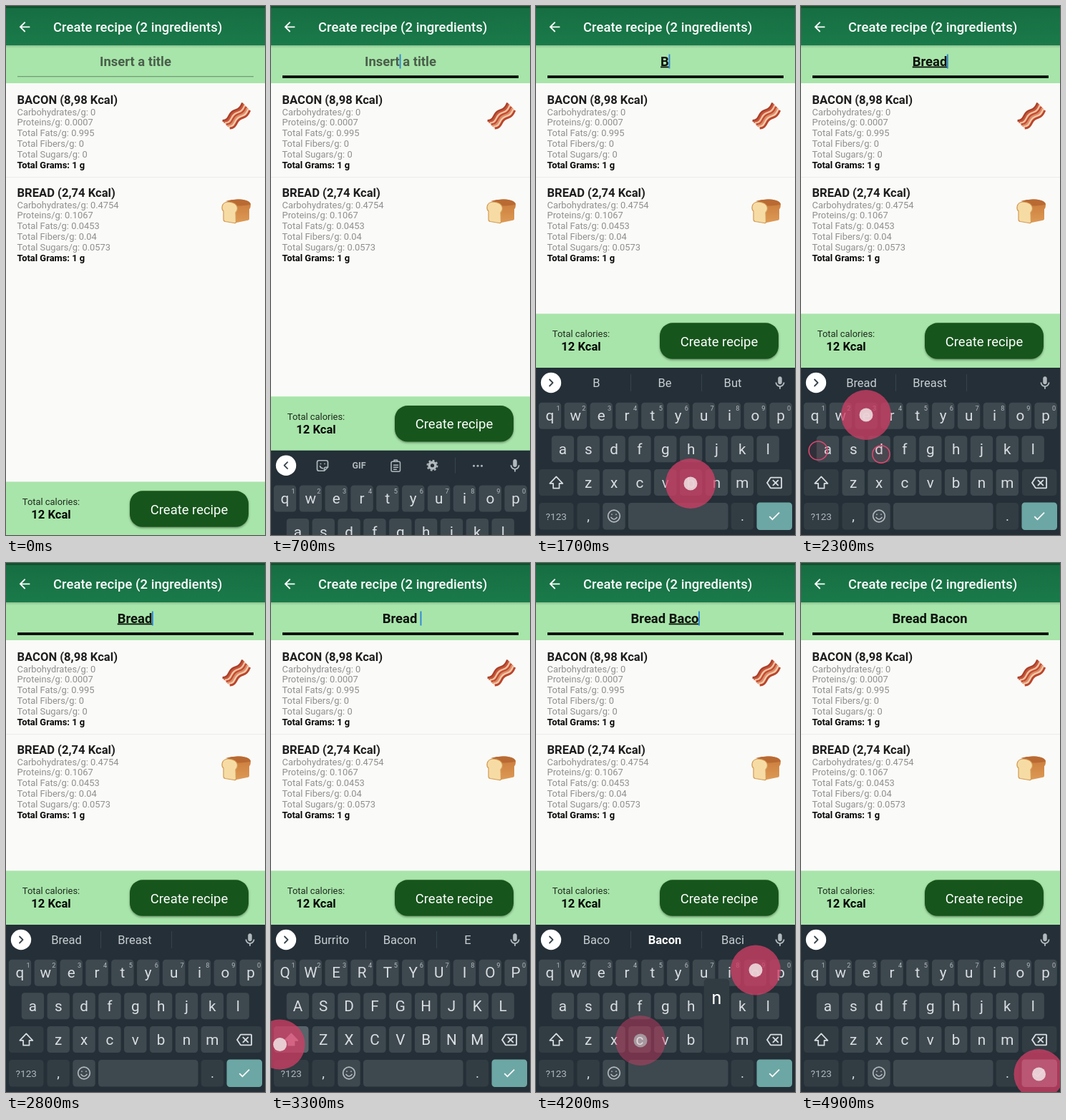
These frames come from a looping animation (362x740 px, 5000 ms). An HTML page:

```html
<!DOCTYPE html>
<html lang="en">
<head>
<meta charset="utf-8">
<title>Create recipe</title>
<style>
  html, body { margin: 0; width: 100%; height: 100%; overflow: hidden; background: #fafaf8; }
  svg { display: block; width: 362px; height: 740px; font-family: Roboto, sans-serif; }
  text { white-space: pre; }
</style>
</head>
<body>
<svg id="stage" viewBox="0 0 362 740">
  <defs>
    <linearGradient id="bar" x2="0" y2="1">
      <stop offset="0" stop-color="#166d41"/><stop offset="1" stop-color="#1a7a4a"/>
    </linearGradient>
    <linearGradient id="shade" x2="0" y2="1">
      <stop offset="0" stop-opacity=".16"/><stop offset="1" stop-opacity="0"/>
    </linearGradient>
    <linearGradient id="side" x2="0" y2="1">
      <stop offset="0" stop-color="#c9793a"/><stop offset="1" stop-color="#dd9a55"/>
    </linearGradient>
    <filter id="drop" x="-10%" y="-20%" width="120%" height="150%">
      <feDropShadow dx="0" dy="1.5" stdDeviation="1.4" flood-opacity=".4"/>
    </filter>
  </defs>
</svg>
<script>
const LOOP = 5000, SLIDE = 235;
const GREEN = '#a8e5aa', KEY = '#3e484f', FUNC = '#313c43', INK = '#d9dee1', DIM = '#b1b9bd';
const stage = document.getElementById('stage');

function el(tag, attrs, parent = stage) {
  const node = document.createElementNS('http://www.w3.org/2000/svg', tag);
  set(node, attrs);
  return parent.appendChild(node);
}
function set(node, attrs) {
  for (const k in attrs) node.setAttribute(k, attrs[k]);
}
function show(node, on) { node.setAttribute('visibility', on ? 'visible' : 'hidden'); }
function rect(x, y, width, height, fill, parent, rx = 0) {
  return el('rect', { x, y, width, height, fill, rx }, parent);
}
function text(str, x, y, size, fill, parent, attrs = {}) {
  const node = el('text', { x, y, 'font-size': size, fill, ...attrs }, parent);
  node.textContent = str;
  return node;
}
const MID = { 'text-anchor': 'middle' }, BOLD = { 'font-weight': 700 };
// Icons use a 24-unit box centred on x, y.
function icon(d, x, y, scale, fill, parent, attrs = {}) {
  const transform = `translate(${x - 12 * scale} ${y - 12 * scale}) scale(${scale})`;
  return el('path', { d, transform, fill, ...attrs }, parent);
}
function line(d, parent, stroke = DIM, width = 1.7) {
  return el('path', { d, fill: 'none', stroke, 'stroke-width': width, 'stroke-linecap': 'round', 'stroke-linejoin': 'round' }, parent);
}

// Header
rect(0, 55, 362, 53, GREEN);
rect(0, 0, 362, 55, 'url(#bar)');
rect(0, 0, 362, 3, '#10532f');
rect(0, 55, 362, 4, 'url(#shade)');
icon('M20 11H7.83l5.59-5.59L12 4l-8 8 8 8 1.41-1.41L7.83 13H20v-2z', 26, 29.3, 0.92, '#fff');
text('Create recipe (2 ingredients)', 66, 36, 18.44, '#fff', stage, { 'font-weight': 500, 'letter-spacing': 0.05 });

// Title field
const hint = text('Insert a title', 181, 83.5, 18.44, '#4a5f4b', stage, { ...MID, ...BOLD });
const title = text('', 180, 83.5, 18.44, '#0c120c', stage, { ...MID, ...BOLD });
const fixed = el('tspan', {}, title);
const composing = el('tspan', { 'text-decoration': 'underline' }, title);
const rule = rect(16, 98, 330, 1, '#66896a');
const caret = rect(180, 67.5, 1.9, 20, '#2f86d8');

// Ingredients
function ingredient(top, name, carbs, proteins, fats, fibers, sugars) {
  text(name, 15.5, top, 16.6, '#1e1e1e', stage, BOLD);
  [`Carbohydrates/g: ${carbs}`, `Proteins/g: ${proteins}`, `Total Fats/g: ${fats}`,
   `Total Fibers/g: ${fibers}`, `Total Sugars/g: ${sugars}`]
    .forEach((s, i) => text(s, 15.5, top + 15.7 + i * 14.75, 12.9, '#8f8f8f'));
  text('Total Grams: 1 g', 15.5, top + 89.5, 12.9, '#060606', stage, BOLD);
}
ingredient(137, 'BACON (8,98 Kcal)', 0, 0.0007, 0.995, 0, 0);
ingredient(267, 'BREAD (2,74 Kcal)', 0.4754, 0.1067, 0.0453, 0.04, 0.0573);
rect(0, 239, 362, 1, '#ececea');

['#a8402a', '#c9553a', '#f0c3a0', '#c44c31', '#dd8a67', '#f2cba9', '#bb452c'].forEach((c, i) =>
  el('path', {
    d: 'M0 0c6 0 8-4 10-8s5-6 9-7 7-5 9-10', fill: 'none', stroke: c, 'stroke-width': 2.9,
    transform: `translate(${302.6 + i * 1.7} ${160.5 + i * 1.75})`
  }));

el('path', { d: 'M309 273q8-3 18-2.5 15 1 15 8 0 4-2 6v13q0 2-3 2.500l-17 3.500V279z', fill: 'url(#side)' });
el('path', { d: 'M307 273q8-3 19-2.500 15 1 16 7-8 2-19 2-4-5-16-6.500z', fill: '#b96a33' });
el('path', { d: 'M304 287q-2.500-2-2-6 1-7 9-7 12 1 12.500 9 0 4-2.500 6l.5 13q0 2-3 1.500l-12-2q-2.500-.5-2.500-3z', fill: '#f6dca4', stroke: '#d39a55', 'stroke-width': 1.2 });

// Footer and keyboard slide together
const sheet = el('g', {});
rect(0, 430.5, 362, 76, GREEN, sheet);
text('Total calories:', 63, 463.3, 12.9, '#1f2a1f', sheet, MID);
text('12 Kcal', 63, 482, 16.6, '#060906', sheet, { ...MID, ...BOLD });
set(rect(173, 443.3, 166, 50.500, '#18541b', sheet, 18), { filter: 'url(#drop)' });
text('Create recipe', 256, 475.7, 18.44, '#fff', sheet, MID);

rect(0, 506, 362, 236, '#242f37', sheet);
el('circle', { cx: 21, cy: 527, r: 14.2, fill: '#fff' }, sheet);
const chevron = line('', sheet, '#37434a', 1.8);
icon('M12 14c1.66 0 3-1.34 3-3V5c0-1.66-1.34-3-3-3S9 3.34 9 5v6c0 1.66 1.34 3 3 3zm5-3c0 2.76-2.24 5-5 5s-5-2.24-5-5H5c0 3.53 2.61 6.43 6 6.92V21h2v-3.08c3.39-.49 6-3.39 6-6.92h-2z', 341, 527.5, 0.92, DIM, sheet);

const tools = el('g', {}, sheet);
line('M67 520h10q2.500 0 2.500 2.500v7l-5 5h-7.500q-2.500 0-2.500-2.500v-9.500q0-2.500 2.500-2.500zM79 529.500h-2.500q-2 0-2 2v2.500M68.500 528q1 3 4 3M69.500 524.500v.2M75 524.500v.2', tools);
text('GIF', 123, 531.7, 12.5, DIM, tools, { ...MID, ...BOLD });
line('M170 521.500h8.500q2 0 2 2v10q0 2-2 2h-8.500q-2 0-2-2v-10q0-2 2-2zM172 521v-1.500h4.500v1.500M171.500 526.500h6M171.500 529.500h6M171.500 532.500h4', tools, DIM, 1.5);
el('circle', { cx: 225.5, cy: 527, r: 4.4, fill: 'none', stroke: DIM, 'stroke-width': 3.6 }, tools);
el('circle', { cx: 225.5, cy: 527, r: 7, fill: 'none', stroke: DIM, 'stroke-width': 2, 'stroke-dasharray': 2.75 }, tools);
rect(257, 516, 1, 22, '#39454c', tools);
[283.5, 289, 294.5].forEach(cx => el('circle', { cx, cy: 527.5, r: 1.5, fill: DIM }, tools));

const words = el('g', {}, sheet);
[132, 231].forEach(x => rect(x, 515, 1, 24, '#37434a', words));
const slots = [84.500, 180, 275].map(x => text('', x, 533, 16.5, '#c8ced2', words, MID));

const PITCH = 35.85, keys = {};
function letterKey(ch, x, y, digit) {
  rect(x - 15.7, y - 18.500, 31.4, 37, KEY, sheet, 4.5);
  const label = text(ch, x, y + 7, 20.7, INK, sheet, MID);
  if (digit) text(digit, x + 11.5, y - 7.5, 9.2, DIM, sheet, MID);
  keys[ch] = { x, y, label };
}
[...'qwertyuiop'].forEach((c, i) => letterKey(c, 19.5 + i * PITCH, 573.3, (i + 1) % 10 + ''));
[...'asdfghjkl'].forEach((c, i) => letterKey(c, 37.4 + i * PITCH, 619.8));
[...'zxcvbnm'].forEach((c, i) => letterKey(c, 73.2 + i * PITCH, 666.5));

const shiftKey = rect(4, 648, 48.500, 37, FUNC, sheet, 4.5);
const arrow = icon('M12 2.500 2 13h5.300v7.500h9.400V13H22z', 28.3, 667, 0.9, 'none', sheet, { stroke: INK, 'stroke-width': 1.9, 'stroke-linejoin': 'round' });
rect(309, 648, 48.500, 37, FUNC, sheet, 4.5);
icon('M22 3H7c-.69 0-1.23.35-1.59.88L0 12l5.41 8.11c.36.53.9.89 1.59.89h15c1.1 0 2-.9 2-2V5c0-1.1-.9-2-2-2zm0 16H7.07L2.400 12l4.660-7H22v14zm-11.590-2L14 13.410 17.590 17 19 15.590 15.410 12 19 8.410 17.590 7 14 10.590 10.410 7 9 8.410 12.590 12 9 15.590z', 333, 667, 0.92, INK, sheet);
rect(4, 695, 48.500, 37.5, FUNC, sheet, 4.5);
text('?123', 28.3, 718.7, 13.6, DIM, sheet, MID);
rect(57.5, 695, 31.4, 37.5, FUNC, sheet, 4.5);
text(',', 73.2, 720, 19, INK, sheet, MID);
rect(93.3, 695, 31.4, 37.5, KEY, sheet, 4.5);
el('circle', { cx: 109, cy: 713.5, r: 8.3, fill: 'none', stroke: DIM, 'stroke-width': 1.7 }, sheet);
line('M105 715.500q4 5 8 0M106 711v.3M112 711v.3', sheet);
rect(129, 695, 139.500, 37.5, KEY, sheet, 4.5);
rect(272.7, 695, 31.4, 37.5, FUNC, sheet, 4.5);
text('.', 288.4, 720, 19, INK, sheet, MID);
rect(308.5, 694.5, 49.500, 38.5, '#6ca7a5', sheet, 4.5);
icon('M9 16.170 4.830 12l-1.420 1.410L9 19 21 7l-1.410-1.410z', 333, 713.5, 0.85, '#fff', sheet);

const popup = el('g', {}, sheet);
rect(-17.8, -85, 35.6, 104, '#303b42', popup, 5);
const popLabel = text('', 0, -50, 25, '#fff', popup, MID);

// Touches: press time, x, y, key
const RELEASE = 110;
const taps = [
  [150, 182, 79, 'field'],
  [945, 30, 670, 'shift'], [1400, 216, 668, 'b'], [1740, 126, 574, 'r'],
  [2020, 91, 572, 'e'], [2095, 24, 622, 'a'], [2170, 112, 627, 'd'], [2700, 200, 714, ' '],
  [3015, 12.5, 673.5, 'shift'], [3400, 216, 669, 'b'], [3620, 30, 622, 'a'],
  [3770, 146, 668, 'c'], [3910, 307, 569.5, 'o'], [4150, 252, 668, 'n'],
  [4610, 332.5, 715, 'enter']
].map(([at, x, y, key]) => {
  const g = el('g', { transform: `translate(${x} ${y})` });
  return {
    at, key, g,
    disc: el('circle', { stroke: '#d8486e' }, g),
    dot: el('circle', { fill: '#f4eeee' }, g)
  };
});

// A leading star marks the bold autocorrect choice.
const guesses = {
  '': 'burrito bacon e',
  B: 'B Be But', Br: 'Br Bread Bring', Bre: 'Bre Bread Break', Brea: 'Brea Bread Break', Bread: 'Bread Breast',
  Ba: 'Ba Bacon Back', Bac: 'Bac Back Bacon', Baco: 'Baco *Bacon Baci', Bacon: 'Bacon Bacons Baron'
};
const capital = s => s.charAt(0).toUpperCase() + s.slice(1);
const mix = (a, b, p) => a + (b - a) * Math.min(1, Math.max(0, p));

function drawTouch(tap, t) {
  const dt = t - tap.at;
  const on = dt >= 120 && dt < 480;
  show(tap.g, on);
  if (!on) return;
  const ring = dt < 240;
  const r = ring ? mix(12, 13, (dt - 120) / 80) : dt < 262 ? 20 : mix(20, 35, (dt - 262) / 14);
  set(tap.g, { opacity: mix(1, 0, (dt - 400) / 80) });
  set(tap.disc, {
    r, fill: '#d23f66', 'fill-opacity': ring ? 0.08 : mix(0.95, 0.76, (dt - 255) / 25), 'stroke-width': ring ? 1.6 : 0
  });
  set(tap.dot, { r: ring ? 0 : mix(11, 9.5, (dt - 255) / 25), 'fill-opacity': 0.8 });
}

function typedAt(t) {
  const s = { text: '', upper: false, done: false, last: 480, pressed: null, shiftDown: false };
  for (const { at, key } of taps) {
    if (t < at) break;
    if (key === 'shift' && t < at + 320) s.shiftDown = true;
    if (keys[key] && t < at + RELEASE) s.pressed = key;
    if (t < at + RELEASE) continue;
    if (key === 'shift') s.upper = true;
    else if (key === 'enter') s.done = t >= at + 150;
    else if (key.length === 1) {
      s.text += s.upper ? key.toUpperCase() : key;
      s.upper = false;
      s.last = at + RELEASE;
    }
  }
  return s;
}

function drawTitle(s, t) {
  const cut = s.done ? s.text.length : s.text.lastIndexOf(' ') + 1;
  const word = s.text.slice(cut);
  show(hint, !s.text);
  fixed.textContent = word || s.done ? s.text.slice(0, cut) : s.text.trimEnd();
  composing.textContent = word;
  const width = s.text ? title.getComputedTextLength() / 2 : 0;
  const gap = s.text.endsWith(' ') ? 4.6 : 0;
  set(caret, { x: 179.6 + width + gap });
  show(caret, t >= 480 && !s.done && (t - s.last) % 1000 < 560);
  const focused = t >= 400;
  set(rule, { y: focused ? 97.2 : 98.2, height: focused ? 3.7 : 1, fill: focused ? '#050805' : '#66896a' });
  return word;
}

function drawKeyboard(s, word) {
  for (const ch in keys) {
    const label = s.upper ? ch.toUpperCase() : ch;
    if (keys[ch].label.textContent !== label) keys[ch].label.textContent = label;
  }
  set(arrow, { fill: s.upper ? INK : 'none' });
  set(shiftKey, { fill: s.shiftDown ? '#59636a' : FUNC });

  set(chevron, { d: s.text ? 'M19 522.500l4.500 4.500-4.500 4.500' : 'M23 522.500l-4.500 4.500 4.500 4.500' });
  show(tools, !s.text);
  show(words, s.text && !s.done);
  const list = (guesses[word] || '').split(' ');
  slots.forEach((slot, i) => {
    const w = list[i] || '', best = w[0] === '*';
    const plain = best ? w.slice(1) : w;
    slot.textContent = s.upper ? capital(plain) : plain;
    set(slot, { 'font-weight': best ? 700 : 400, fill: best ? '#fff' : '#c8ced2' });
  });

  show(popup, s.pressed);
  if (s.pressed) {
    const { x, y } = keys[s.pressed];
    set(popup, { transform: `translate(${x} ${y})` });
    popLabel.textContent = s.upper ? s.pressed.toUpperCase() : s.pressed;
  }
}

function draw(t) {
  const p = Math.min(1, Math.max(0, (t - 600) / 200));
  const ease = p * p * (3 - 2 * p);
  set(sheet, { transform: `translate(0 ${SLIDE * (1 - ease)})` });
  const s = typedAt(t);
  drawKeyboard(s, drawTitle(s, t));
  taps.forEach(tap => drawTouch(tap, t));
}

const start = performance.now();
function tick() {
  draw((performance.now() - start) % LOOP);
  requestAnimationFrame(tick);
}
tick();
</script>
</body>
</html>
```
